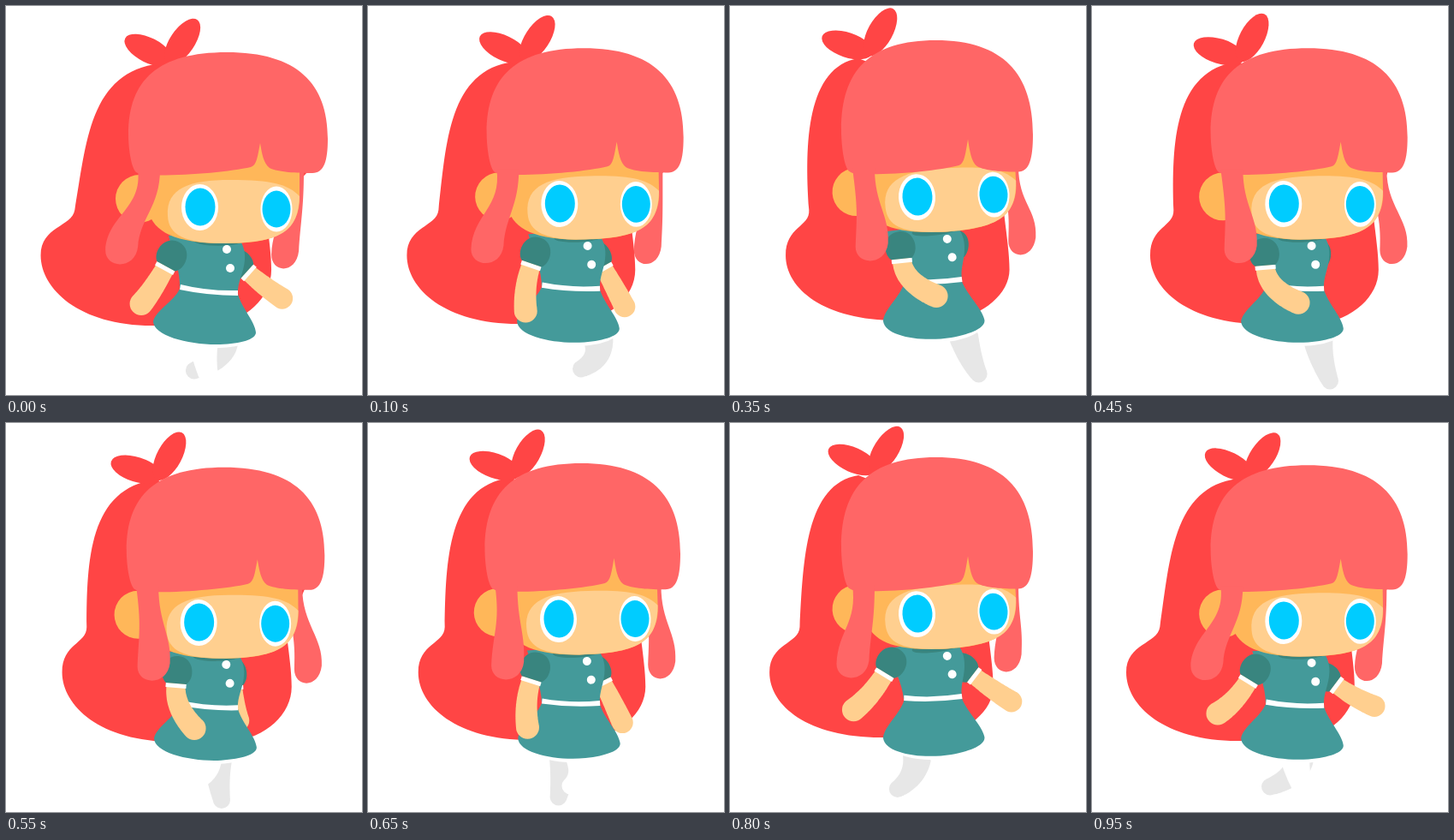
These frames come from a looping animation (416 by 454 pixels, 1000 ms). An HTML page with a canvas:

```html
<!DOCTYPE html>
<html>
<head>
<meta charset="utf-8">
<style>
html, body { margin: 0; width: 100%; height: 100%; overflow: hidden; background: #fff; }
canvas { display: block; }
</style>
</head>
<body>
<canvas id="stage" width="416" height="454"></canvas>
<script>
const c = document.getElementById('stage').getContext('2d');
const HAIR = '#ff6666', BACK = '#ff4545', SKIN = '#ffcf8f', SHADE = '#ffb759',
      DRESS = '#449a9a', DARK = '#39857f', LEG = '#e7e7e7', WHITE = '#fff';

// Swing from -1 to 1 that peaks at the given time (ms)
const swing = (t, peak) => Math.cos((t - peak) * Math.PI / 500);

// Two bobs per loop: slow rise, quick fall
function bob(t) {
  const h = t % 500;
  return Math.min(h / 300, (500 - h) / 150);
}

function shape(d, color) {
  c.fillStyle = color;
  c.fill(new Path2D(d));
}
function oval(x, y, rx, ry, color) {
  c.fillStyle = color;
  c.beginPath();
  c.ellipse(x, y, rx, ry, 0, 0, 7);
  c.fill();
}
function group(draw) {
  c.save();
  draw();
  c.restore();
}

// Tapered limb along a quadratic curve
function limb(a, b, e, r0, r1, color) {
  c.fillStyle = color;
  c.beginPath();
  for (let i = 0; i <= 40; i++) {
    const u = i / 40, v = 1 - u, r = r0 + (r1 - r0) * u;
    const [x, y] = [0, 1].map(k => v * v * a[k] + 2 * u * v * b[k] + u * u * e[k]);
    c.moveTo(x + r, y);
    c.arc(x, y, r, 0, 7);
  }
  c.fill();
}

// dx, dy lead from the cuff to the elbow
function arm(x, y, dx, dy, hand, w) {
  limb([x, y], [x + dx, y + dy], hand, w, w + 2.5, SKIN);
  group(() => {
    c.translate(x, y);
    c.rotate(Math.atan2(dy, dx) - Math.PI / 2);
    shape(`M${-w - 1} -2H${w + 1}V3H${-w - 1}Z`, WHITE);
    shape(`M${-w - 1} -2C${-w * 2} -10 ${-w * 1.7} -34 0 -34C${w * 1.7} -34 ${w * 2} -10 ${w + 1} -2Z`, DARK);
  });
}

function leftArm(t, q) {
  const s = swing(t, 380);
  arm(194 - 4 * q + 11 * s, 307 - 12 * q + 2 * s, 10 * s - 7, 26,
    [196 - 6 * q + 52 * s, 360 - 8 * q - 18 * s * s + 4 * s], 11);
}

function rightArm(t, q) {
  const s = swing(t, 380);
  arm(273 - 14 * s, 311 - 16 * q, 8 - 14 * s, 20 + 5 * s,
    [292 - 42 * s, 355 - 10 * q - 26 * s * s], 10);
}

function leg(t, q, shift, color) {
  const hip = [256 - 8 * bob(t) + 30 * swing(t, 260) + shift, 393 - 6 * q];
  const foot = [243 + 48 * swing(t, 330) + shift, 433 - 6 * q + 8 * swing(t, 550)];
  const knee = [(hip[0] + foot[0]) / 2 + 6 + 10 * swing(t, 970), 413];
  limb(hip, knee, foot, 17, 10, color);
}

function lock(x, y, w, bx, by, r) {
  shape(`M${x - w} ${y}C${x - w + 6} ${y + 45} ${bx - r + 2} ${by - 38} ${bx - r} ${by + 2}
    C${bx - r} ${by + 24} ${bx + r - 3} ${by + 25} ${bx + r} ${by - 2}
    C${bx + r + 2} ${by - 35} ${x + w} ${y + 43} ${x + w} ${y}Z`, HAIR);
}

function tufts(q, s) {
  for (const deg of [202 - 5 * s, -59 - 3 * s]) group(() => {
    c.translate(186 - 20 * q - 5 * s, 64 - 10 * q);
    c.rotate(deg * Math.PI / 180);
    oval(27, 0, 31, 14.5, BACK);
  });
}

function backHair(q, s) {
  const l = 54 + 14 * s, r = 323.5 - 8 * q + 14 * s;
  const tx = 180 - 30 * q, ty = 67 - 6 * q, low = 373 - 6 * q;
  const u = 97 - 9 * q + s, w = 88 - 2 * q + 8 * s;
  shape(`M300 120L${tx} ${ty}C${u + 1} ${ty + 10} ${u - 2} 160 ${w} 238
    C${w - (u - 2 - w) / 4} 258 ${l} 257 ${l} 291C${l} 330 ${l + 45} ${low} ${l + 130} ${low}
    L${r - 70} ${low}C${r - 30} ${low - 5} ${r} ${low - 32} ${r} 308
    C${r} 290 ${r - 3} 270 ${r - 6} 245L${353 - 22 * q} 193Z`, BACK);
}

const SKIRT = 'M203 330C196 345 175 355 172 368C172 385 215 396 250 395C275 394 292 389 292 381C291 368 275 352 271 336Z';

function body(q) {
  c.translate(237, 332 - 11.5 * q);
  c.rotate(-0.131 * q);
  group(() => {
    c.scale(1 - 0.02 * q, 1 + 0.09 * q);
    group(() => {
      c.scale(0.94, 1);
      c.translate(-237, -328);
      shape(SKIRT, WHITE);
    });
    c.translate(-237, -332);
    shape(SKIRT, DRESS);
  });
  c.translate(-237, -332);
  shape('M190 268C196 290 204 310 203 330L271 336C270 322 278 312 279 296C280 285 276 276 270 268Z', DRESS);
  oval(248, 274, 28, 6, DARK);
  shape('M204 325Q236 333 271 332L271 338Q236 338 203 331Z', WHITE);
  oval(258 + 2 * q, 284 + 2 * q, 5, 5, WHITE);
  oval(262 + q, 306 + 2 * q, 5, 5, WHITE);
}

function face(q) {
  c.translate(270 - 8 * q, 236 - 14.3 * q);
  c.rotate(-0.056 * q);
  c.translate(-270, -236);
  oval(156, 225, 28, 28, SHADE);
  shape('M165 150V235C170 260 190 275 245 277C300 278 340 272 343 228V150Z', SHADE);
  shape('M189 245C187 212 215 203 262 203C310 203 330 208 343 222C341 262 325 277 250 277C210 276 190 268 189 245Z', SKIN);
  oval(226.5, 235, 21.5, 27, WHITE);
  oval(227, 234.5, 17.5, 22, '#00ccff');
  oval(316, 237, 18.5, 26.5, WHITE);
  oval(316, 237, 16.5, 21.5, '#00ccff');
}

function bangs(q) {
  c.transform(1 - 0.0386 * q, 0, 0, 1 + 0.089 * q, -7.5 * q, -18.8 * q);
  shape(`M152 194C146 188 143 165 143 150C143 86 178 54 258 54C340 54 376 90 376 155
    C376 180 372 195 358 195C340 195 318 194 308 189C301 184 299 172 297 160
    C294 175 293 186 286 188C260 194 200 199 160 197Q155 196 152 194Z`, HAIR);
}

function draw(t) {
  const q = bob(t), s = swing(t, 480);
  c.fillStyle = WHITE;
  c.fillRect(0, 0, 416, 454);
  backHair(q, swing(t, 455));
  tufts(q, s);
  lock(338 - 11 * q, 193 - 6 * q, 10, 341 - 10 * q + 15 * s, 288 - 16 * q, 16);
  rightArm(t, q);
  leg(t, q, 0, LEG);
  leg(t + 500, q, -27, WHITE);
  group(() => body(q));
  leftArm(t, q);
  group(() => face(q));
  group(() => bangs(q));
  lock(167 - 11 * q, 191 - 2 * q, 13, 155 - 3 * q + 20 * s, 283 - 4 * q, 19);
}

let start;
function tick(now) {
  start ??= now;
  draw(Math.floor((now - start) % 1000 / 50) * 50);
  requestAnimationFrame(tick);
}
draw(0);
requestAnimationFrame(tick);
</script>
</body>
</html>
```
